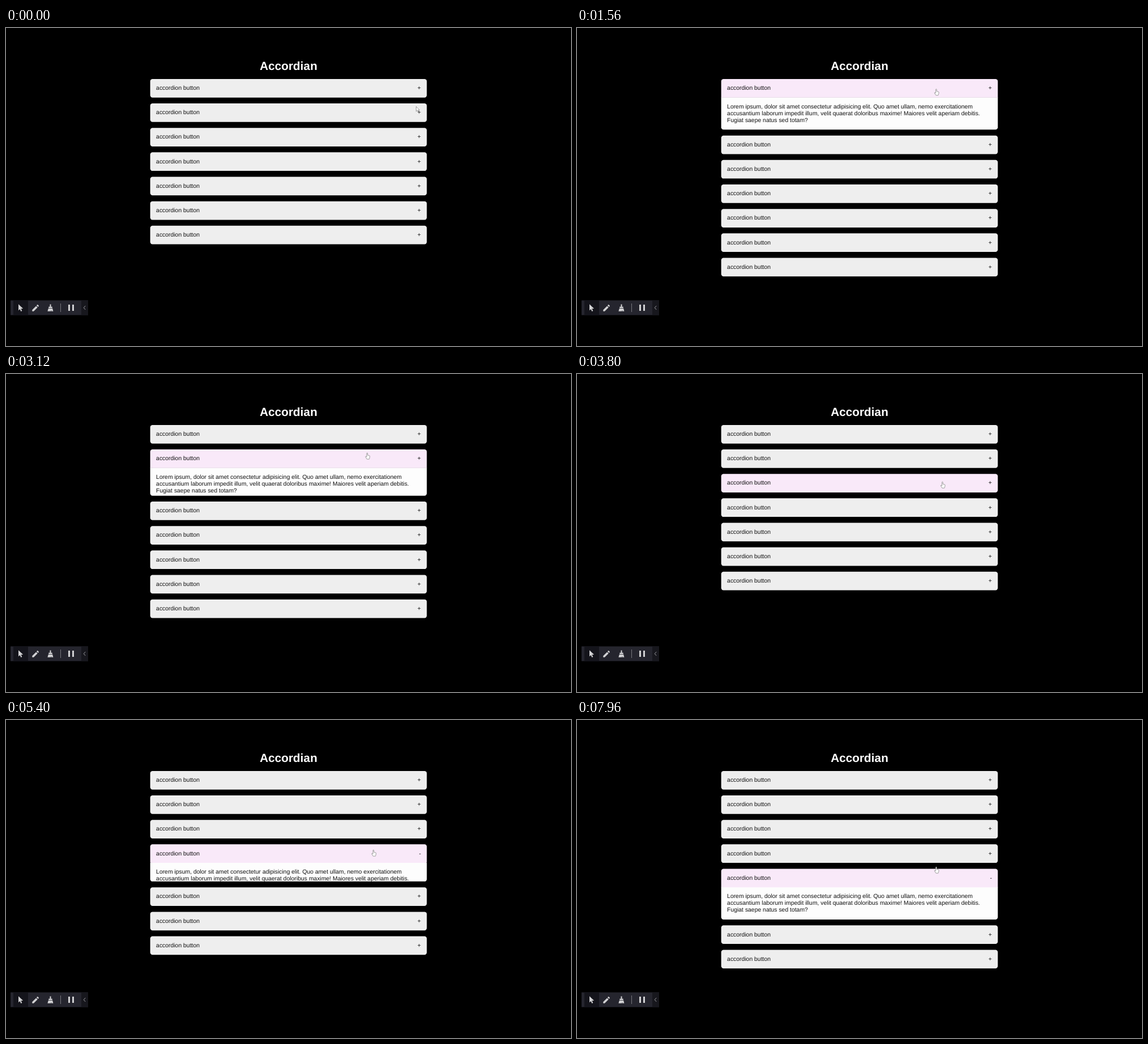
An HTML page for the animation above (8 s loop, 998 by 561 pixels).

```html
<!DOCTYPE html>
<html lang="en">
<head>
<meta charset="utf-8">
<title>Accordian</title>
<style>
  html, body { margin: 0; width: 100%; height: 100%; overflow: hidden; background: #000; }
  #page {
    position: absolute; left: 0; top: 0; width: 1920px; height: 1079px;
    transform: scale(.5198); transform-origin: 0 0;
    font: 20px/23px "Liberation Sans", Arial, sans-serif;
    text-rendering: geometricPrecision; color: #111;
  }
  h1 { position: absolute; top: 107px; width: 100%; margin: 0; text-align: center; font-size: 40px; line-height: 46px; color: #fff; }
  #list { position: absolute; left: 490px; top: 173px; width: 940px; }
  .item { margin-bottom: 20px; }
  .head { position: relative; z-index: 1; display: flex; justify-content: space-between; padding: 20px; height: 23px; border-radius: 8px; }
  .panel { overflow: hidden; background: #fdfdfd; border-radius: 0 0 8px 8px; }
  .panel p { margin: 0; padding: 21px 20px 20px; }
  svg { position: absolute; left: 0; top: 0; }
</style>
</head>
<body>
<div id="page">
  <h1>Accordian</h1>
  <div id="list"></div>
</div>
<svg width="998" height="561" viewBox="0 0 998 561">
  <g id="toolbar">
    <path fill="#25252e" d="M8 480.5h137v26H8z"/>
    <path fill="#14141b" d="M13 480.5h26v26H13z"/>
    <path fill="#17171d" d="M133 480.5h12v26h-12z"/>
    <g fill="#d2d2d4">
      <path d="M22 487.3v11l2.6-2.3 1.8 4 1.9-.9-1.8-3.9 3.6-.2z"/>
      <path d="M46.3 497.2v2.6h2.6l6.8-6.9-2.5-2.5zM54 489.6l2.5 2.5 1.2-1.2q.5-.6 0-1.2l-1.4-1.4q-.6-.5-1.2 0z"/>
      <path d="M77.5 487.5h2v4.2h2.2v2.3h-6.4v-2.3h2.2zM74.8 494.8h7.4l1.2 5h-2.2l-.5-2.2v2.2h-1.5v-2.2l-.5 2.2h-5.3z"/>
      <path d="M110 488h3v11h-3zM117 488h3v11h-3z"/>
    </g>
    <path stroke="#77777d" d="M96.5 486v15"/>
    <path fill="none" stroke="#a5a5aa" d="M140.2 490.2l-3 3.3 3 3.3"/>
  </g>
  <g id="cursor" fill="#fff" stroke="#777" stroke-width=".7" stroke-linejoin="round">
    <path id="arrow" d="M0 0v8.6l2-1.8 1.3 3 1.3-.6-1.3-2.9h2.7z"/>
    <path id="hand" d="M-.8 .7q.8-1.3 1.6 0v3.5l3 .7q1 .3 .9 1.4l-.5 3-.7 1.9h-4l-2.4-3.7q-.5-1.2.5-1.2l1.6 1z"/>
  </g>
</svg>
<script>
const DURATION = 8000, STEP = 40, OPEN_MS = 300, HOVER_MS = 160, PANEL_HEIGHT = 109;
const COPY = 'Lorem ipsum, dolor sit amet consectetur adipisicing elit. Quo amet ullam, nemo exercitationem ' +
  'accusantium laborum impedit illum, velit quaerat doloribus maxime! Maiores velit aperiam debitis. ' +
  'Fugiat saepe natus sed totam?';

// Each range is [start, end] in ms.
const schedule = [
  { hover: [[420, 1940]], open: [946, 1560] },
  { hover: [[20, 390], [2000, 3480]], open: [2320, 3083] },
  { hover: [[3520, 4980]], open: [3820, 4500] },
  { hover: [[5040, 6760]], open: [5300, 6000] },
  { hover: [[6820, 9000]], open: [7150, 9000] },
  { hover: [] },
  { hover: [] }
];

// Pointer stops: time, x, y.
const stops = [
  [0, 724.5, 138.5], [720, 634.5, 107.5], [1740, 634.5, 107.5], [2060, 638, 139],
  [3380, 638, 139], [3700, 645.5, 190], [4860, 645.5, 190], [5180, 649, 229],
  [6600, 649, 229], [6980, 640, 273], [7700, 640, 273], [7960, 634.5, 259]
];

const $ = id => document.getElementById(id);
const clamp = v => Math.max(0, Math.min(1, v));
const mix = (a, b, k) => a + (b - a) * k;
const smooth = k => k * k * (3 - 2 * k);

// The CSS "ease" curve.
function ease(x) {
  if (x === 0 || x === 1) return x;
  const curve = (a, b, s) => 3 * a * s * (1 - s) ** 2 + 3 * b * s * s * (1 - s) + s ** 3;
  let low = 0, high = 1;
  for (let i = 0; i < 16; i++) {
    const mid = (low + high) / 2;
    if (curve(.25, .25, mid) < x) low = mid; else high = mid;
  }
  return curve(.1, 1, low);
}

const level = (t, [start, end], ms) => ease(clamp((t - start) / ms)) - ease(clamp((t - end) / ms));

const items = schedule.map(plan => {
  const item = document.createElement('div');
  item.className = 'item';
  item.innerHTML = `<div class="head"><span>accordion button</span><span>+</span></div>
    <div class="panel"><p>${COPY}</p></div>`;
  $('list').append(item);
  const [head, panel] = item.children;
  return { ...plan, head, panel, sign: head.lastChild };
});

function drawItem({ hover, open, head, panel, sign }, t) {
  const tint = Math.max(0, ...hover.map(range => level(t, range, HOVER_MS)));
  const opened = open ? level(t, open, OPEN_MS) : 0;
  const radius = 8 * (1 - opened);
  const overlap = opened > 0 ? 1 : 0; // hides the seam under the button
  head.style.background = `rgb(${mix(238, 249, tint)}, ${mix(238, 233, tint)}, ${mix(238, 249, tint)})`;
  head.style.borderRadius = `8px 8px ${radius}px ${radius}px`;
  panel.style.height = PANEL_HEIGHT * opened + overlap + 'px';
  panel.style.marginTop = -overlap + 'px';
  sign.textContent = open && t >= open[0] && t < open[1] ? '-' : '+';
}

function drawCursor(t) {
  const next = stops.findIndex(stop => stop[0] > t);
  const b = stops[next < 0 ? stops.length - 1 : next];
  const a = next < 0 ? b : stops[next - 1];
  const k = a === b ? 0 : smooth((t - a[0]) / (b[0] - a[0]));
  const x = mix(a[1], b[1], k), y = mix(a[2], b[2], k);
  const isArrow = t < STEP;
  $('cursor').setAttribute('transform', `translate(${x} ${y})`);
  $('arrow').style.display = isArrow ? '' : 'none';
  $('hand').style.display = isArrow ? 'none' : '';
}

const begin = performance.now();
function render(now) {
  const elapsed = Math.max(0, now - begin) + 10;
  const t = Math.floor(elapsed / STEP) * STEP % DURATION;
  items.forEach(item => drawItem(item, t));
  drawCursor(t);
  requestAnimationFrame(render);
}
render(begin);
</script>
</body>
</html>
```
